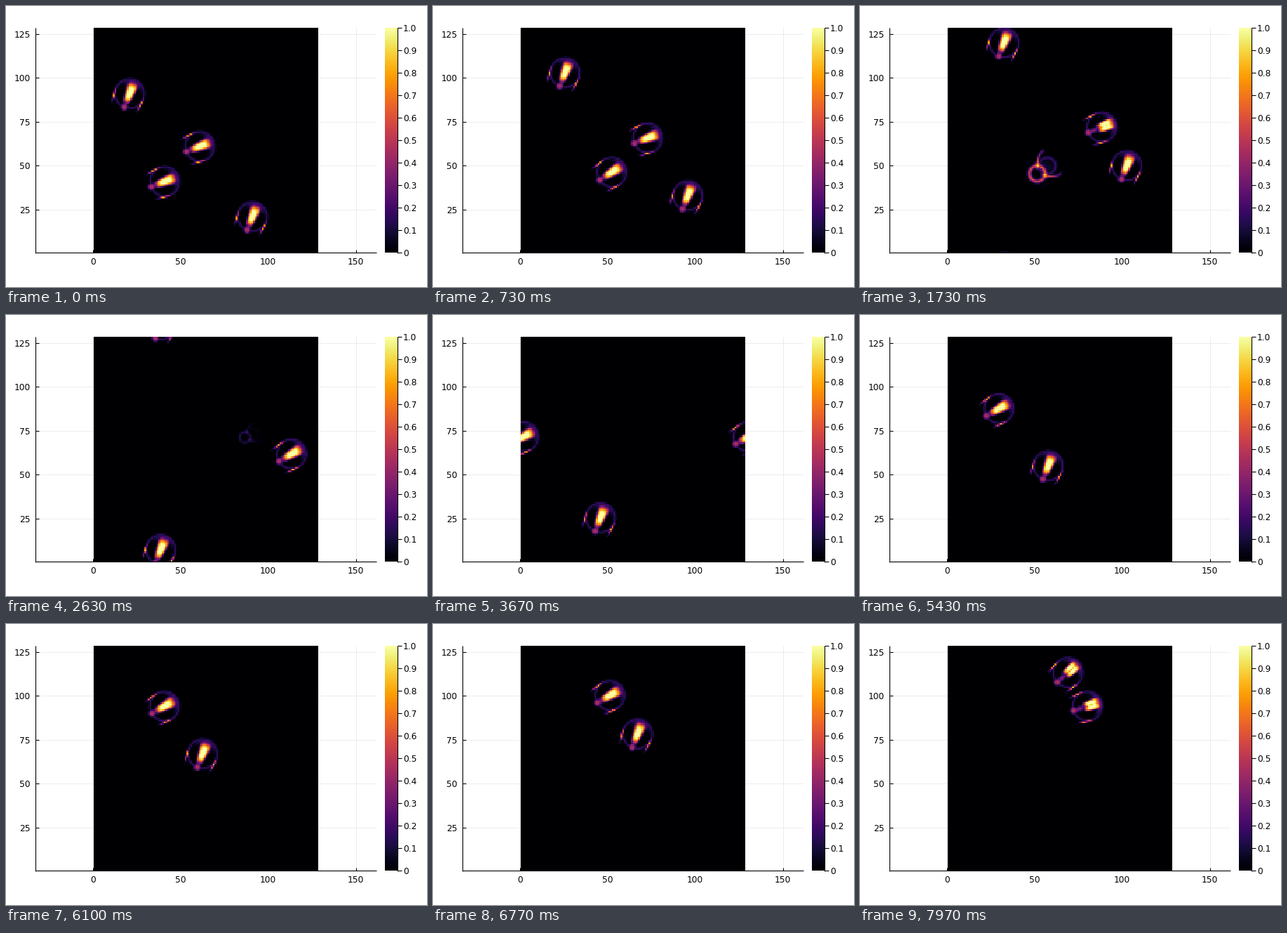
Recreate the animation shown at these times as a matplotlib script. Size 600 by 400 pixels, loop 8 s.

```python
import numpy as np
import matplotlib.pyplot as plt
from matplotlib.animation import FuncAnimation

plt.rcParams["font.family"] = "DejaVu Sans"

N = 128
FRAMES = 240
SPEED = 0.612  # cells per frame
STEEP, SHALLOW = 68.2, 21.8  # starting headings in degrees
GX, GY = np.meshgrid(np.arange(1, N + 1), np.arange(1, N + 1))


def ease(t, start, span):
    x = np.clip((t - start) / span, 0, 1)
    return x * x * (3 - 2 * x)


def bell(d, width):
    return np.exp(-(d / width) ** 2)


def plateau(d, width):
    return np.exp(-(d / width) ** 4)


def track(x, y, heading, worn, turns=(), halt=None):
    """Position, angle and wear per frame; turns are (degrees, start, span).

    Wear 0-1 strains the body, 1-2 breaks it into two rings, 2-3 fades it out.
    """
    t = np.arange(FRAMES)
    angle = np.full(FRAMES, heading, float)
    for degrees, start, span in turns:
        angle += degrees * ease(t, start, span)
    angle = np.radians(angle)
    step = SPEED * np.exp(1j * angle)
    if halt is not None:
        step *= 1 - ease(t, halt - 7, 14)
    place = x + 1j * y + np.cumsum(step) - step
    wear = np.clip((t - worn) / 14, 0, 1 if halt is None else 3)
    return place, angle, wear


GLIDERS = [
    track(21.1, 91.1, STEEP, worn=226, turns=[(-50, 220, 11)]),
    track(91.1, 21.1, STEEP, worn=226, turns=[(-38, 55, 16), (12, 205, 30)]),
    track(61.1, 61.1, SHALLOW, worn=39, halt=48),
    track(41.1, 41.1, SHALLOW, worn=24, turns=[(16, 5, 25)], halt=23),
]


def body(u, v, strain):
    """Healthy glider; u runs along the heading, v across it."""
    a = np.abs(v)
    r = np.hypot(u, v)
    ring = 0.17 * bell(r - 8.3, 0.7)
    front = ((0.22 + 0.12 * strain) * bell(np.arctan2(a, u), 0.9)
             * bell(r - 7.2, 1.6))
    along = 1.05 * plateau(u - 0.5 - 2.3 * strain, 5.8 - 1.5 * strain)
    width = np.clip(2.4 + 0.12 * u, 1.3, 3) * (1 - 0.4 * strain)
    core = along * plateau(a - 1.3 * strain, width)
    stalk = 0.35 * plateau(u + 5, 3) * bell(v, 1.3)
    tail = 0.45 * plateau(np.hypot(u + 8.2, v), 1.9)
    whisker = 0.85 * bell(u + 3.5, 3.2) * bell(a - 8.5 - 0.11 * u, 0.5)
    return np.maximum.reduce([ring, front, core, stalk, tail, whisker])


def wreck(u, v):
    """Collapsed glider: two rings joined at bright knots."""
    a = np.abs(v)
    rear = 0.6 * bell(np.hypot(u + 3, v) - 4.4, 1)
    fore = 0.18 * bell(np.hypot(u - 4.4, v) - 4.6, 0.9)
    knots = bell(np.hypot(u, a - 3.5), 1.6)
    glow = np.where((u > 0) & (u < 8.5), 0.8 * np.exp(-u / 6), 0)
    whisker = glow * bell(a - 3.5 - 1.3 * u + 0.09 * u ** 2, 0.8)
    return np.maximum.reduce([rear, fore, knots, whisker])


def glider(place, angle, wear):
    strain, broken, gone = np.clip(wear - np.arange(3), 0, 1)
    if gone == 1:
        return np.zeros((N, N))
    dx = (GX - place.real + N / 2) % N - N / 2
    dy = (GY - place.imag + N / 2) % N - N / 2
    local = (dx + 1j * dy) * np.exp(-1j * angle) / (1 - 0.4 * gone)
    u, v = local.real, local.imag
    mix = (1 - broken) * body(u, v, strain) + broken * wreck(u, v)
    return mix * (1 - gone)


def world(t):
    field = np.maximum.reduce([glider(p[t], a[t], w[t])
                               for p, a, w in GLIDERS])
    field[field < 0.015] = 0
    return np.clip(field, 0, 1)


fig = plt.figure(figsize=(6, 4), dpi=100, facecolor="white")
ax = fig.add_axes([0, 0, 1, 1])
ax.axis("off")


def line(xs, ys, **style):
    style = {"color": "black", "lw": 0.8, "solid_capstyle": "butt", **style}
    ax.plot(xs, ys, **style)


def label(x, y, text, ha):
    ax.text(x, y, text, ha=ha, va="center_baseline", fontsize=8.8)


LEFT, RIGHT, TOP, BOTTOM = 42, 528, 31, 351
grid = {"color": "black", "alpha": 0.1, "lw": 0.5, "zorder": 0}

for value in range(0, 151, 50):
    x = 123.75 + 2.5 * value
    line([x, x], [TOP, BOTTOM], **grid)
    line([x, x], [BOTTOM - 4, BOTTOM], zorder=1)
    label(x, 363, str(value), "center")
for value in range(25, 126, 25):
    y = 352.25 - 2.5 * value
    line([LEFT, RIGHT], [y, y], **grid)
    line([LEFT, LEFT + 5], [y, y], zorder=1)
    label(35, y, str(value), "right")
line([LEFT, LEFT], [TOP, BOTTOM + 1], zorder=4)
line([LEFT, RIGHT], [BOTTOM, BOTTOM], zorder=4)

heat = dict(cmap="inferno", vmin=0, vmax=1, origin="lower",
            interpolation="nearest", zorder=3)
image = ax.imshow(world(0), extent=(125, 445, BOTTOM, TOP), **heat)
ax.imshow(np.linspace(0, 1, 256)[:, None],
          extent=(540, 558, BOTTOM, TOP), **heat)

line([558, 558], [TOP, BOTTOM + 1], zorder=4)
for i in range(11):
    y = BOTTOM - 32 * i
    line([558, 564], [y, y], zorder=4)
    label(566, y, f"{i / 10:.1f}" if i else "0", "left")

ax.set_aspect("auto")
ax.set_xlim(0, 600)
ax.set_ylim(400, 0)


def update(t):
    image.set_data(world(t))
    return [image]


anim = FuncAnimation(fig, update, frames=FRAMES, interval=8000 / FRAMES,
                     init_func=lambda: update(0), repeat=True,
                     repeat_delay=0, blit=False)
plt.show()
```
